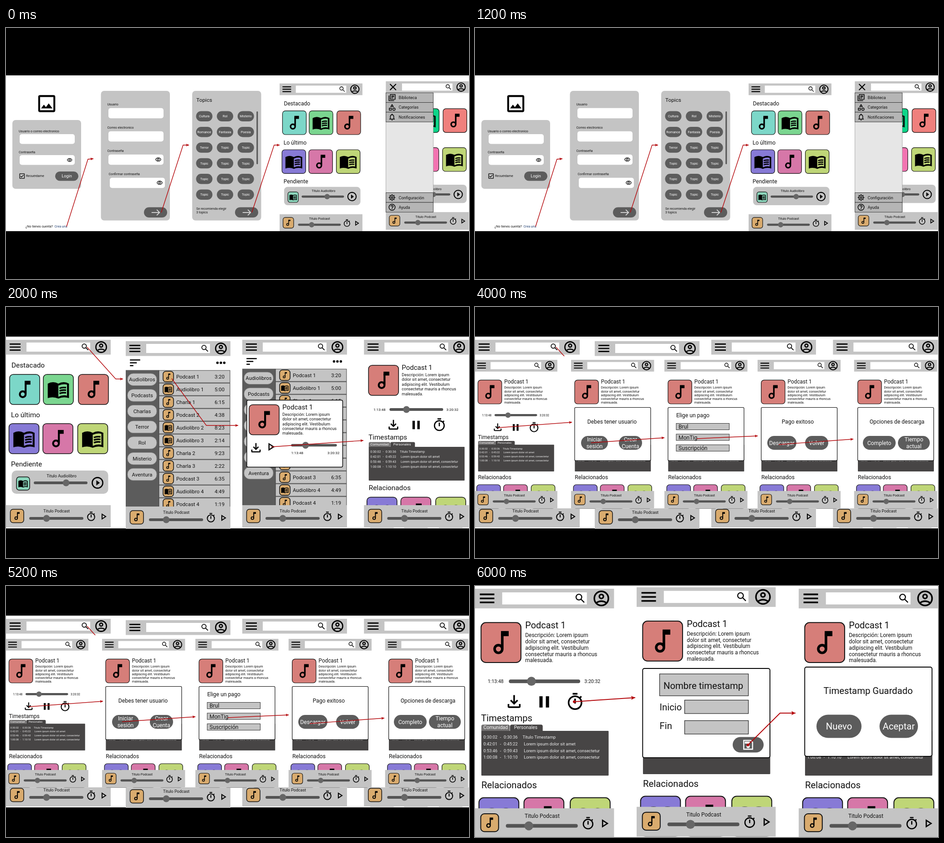
Write an HTML page that moves like this. It is 1017 px wide and 551 px high and loops after 8 s.

```html
<!DOCTYPE html>
<html lang="es">
<head>
<meta charset="utf-8">
<style>
html, body { margin: 0; width: 100%; height: 100%; overflow: hidden; background: #000; }
svg { display: block; font-family: Roboto, sans-serif; }
</style>
</head>
<body>
<svg id="stage" width="1017" height="551" viewBox="0 0 1017 551"></svg>
<script>
const GREY = '#c4c4c4', DARK = '#5c5c5c', RED = '#d67e79', TAN = '#d9ab6e', PURPLE = '#877ad6',
  PINK = '#d677a8', LIME = '#bfd677', TEAL = '#7cd7c8', GREEN = '#7bd690';

// Icons on a 24 unit grid: [stroked path, filled path, stroke width]
const ring = (x, y, r) => `M${x - r} ${y}a${r} ${r} 0 1 0 ${2 * r} 0 ${r} ${r} 0 1 0 ${-2 * r} 0`;
const teeth = [...Array(8).keys()].map(i => {
  const c = Math.cos(i * Math.PI / 4), s = Math.sin(i * Math.PI / 4);
  return `M${12 + 7 * c} ${12 + 7 * s}L${12 + 9.7 * c} ${12 + 9.7 * s}`;
}).join('');
const box = 'M5 4h14q1 0 1 1v14q0 1-1 1H5q-1 0-1-1V5q0-1 1-1z';
const ICONS = {
  menu: ['M3 7h18M3 12h18M3 17h18'],
  sort: ['M3 7h18M3 12h12M3 17h6'],
  close: ['M5.7 5.7 18.3 18.3M18.3 5.7 5.7 18.3'],
  search: [ring(9.5, 9.5, 5.5) + 'M13.5 13.5 19.8 19.8'],
  user: [ring(12, 12, 9) + ring(12, 9.5, 2.6) + 'M5.6 17.6Q12 13.4 18.4 17.6'],
  note: [ring(10, 17, 3) + 'M13 17V5', 'M12 3h6v4h-6z'],
  book: ['M13.2 10.8q3-1.3 6.8-.7m-6.8 3.4q3-1.3 6.8-.7m-6.8 3.4q3-1.3 6.8-.7',
    'M1 6q5.5-3 11 0 5.5-3 11 0v15q-5.5-2-11 .5-5.5-2.5-11-.5zM12 8v11.5q5-2.2 9-1V7q-4-1.2-9 1z', 1.6],
  play: ['M9 6.8v10.4L17.1 12z'],
  playRing: [ring(12, 12, 9), 'M10 16.5v-9l6 4.5z'],
  timer: [ring(12, 13, 8) + 'M12 8v6M9 2h6M18.2 6.8 19.8 5.2'],
  pause: ['', 'M6 5h4v14H6zM14 5h4v14h-4z'],
  download: ['M12 4v10M7.7 10.3l4.3 4.3 4.3-4.3M5 15v3q0 1 1 1h12q1 0 1-1v-3'],
  image: [box, 'M6 17l3-3.9 2.1 2.6 3-3.9L18 17z'],
  check: [box + 'M6.7 12.3l3.3 3.3 7.3-7.3'],
  eye: ['M2.1 11.5Q5 5 12 5t9.9 6.5Q19 18 12 18T2.1 11.5z' + ring(12, 11.5, 3.5)],
  books: ['M3 6v15h15M7 3h14v14H7zM10 7h8m-8 3h8m-8 3h4'],
  shapes: ['M12 4 8.3 10h7.4zM4 14.5h6v6H4z' + ring(17.5, 17.5, 3.5)],
  bell: ['M7 18v-7q0-5.5 5-5.5t5 5.5v7M4 18h16', ring(12, 4, 1.5) + 'M10 20h4q0 2-2 2t-2-2z'],
  gear: [ring(12, 12, 6.8) + ring(12, 12, 2.7) + teeth],
  help: [ring(12, 12, 9) + 'M9 10q0-3 3-3t3 3c0 2-3 2-3 5M12 16v2'],
  save: ['M4 4h12.6L20 7.4V20H4z', 'M6 6h9v4H6z' + ring(12, 15, 3)],
  next: ['M2 12h20M15 5l7 7-7 7']
};

const icon = (name, x, y, size, color = '#000') => {
  const [line, fill = '', w = 2] = ICONS[name];
  return `<g transform="translate(${x - size / 2} ${y - size / 2}) scale(${size / 24})">
    <path d="${fill}" fill="${color}" fill-rule="evenodd"/>
    <path d="${line}" fill="none" stroke="${color}" stroke-width="${w}"/></g>`;
};
const rect = (x, y, w, h, fill, r = 0, stroke = 'none', sw = 1) =>
  `<rect x="${x}" y="${y}" width="${w}" height="${h}" rx="${r}" fill="${fill}" stroke="${stroke}" stroke-width="${sw}"/>`;
const text = (x, y, size, str, fill = '#111', anchor = 'start') =>
  `<text x="${x}" y="${y}" font-size="${size}" fill="${fill}" text-anchor="${anchor}">${str}</text>`;
const mid = (x, y, size, str, fill) => text(x, y + size * .355, size, str, fill, 'middle');
const at = (x, y, scale, body) => `<g transform="translate(${x} ${y}) scale(${scale})">${body}</g>`;
const tile = (x, y, size, fill, name) =>
  rect(x, y, size, size, fill, size > 40 ? 8 : 6, '#111', 1.5) + icon(name, x + size / 2, y + size / 2, size * .77);
const slider = (x1, x2, y, knob, w = 6) =>
  `<path d="M${x1} ${y}H${x2}" stroke="#545454" stroke-width="${w}" stroke-linecap="round"/>
   <circle cx="${knob}" cy="${y}" r="7.4" fill="#666"/>`;
// Pill button with one or more lines of text
const pill = (x, y, w, h, size = 0, ...lines) => rect(x, y, w, h, DARK, h / 2) +
  lines.map((s, i) => mid(x + w / 2, y + h / 2 + (i - (lines.length - 1) / 2) * size * 1.18, size, s, '#fff')).join('');
const arrow = (points, w = 1.4) =>
  `<polyline points="${points}" fill="none" stroke="#b4080c" stroke-width="${w}" marker-end="url(#head)"/>`;

// Phone parts, drawn on a screen 230 wide and 411 high
const header = (left = 'menu') => rect(0, 0, 230, 32.5, GREY) + rect(45, 6, 140, 20, '#fff') +
  icon(left, 20, 16, 32) + icon('search', 174, 16, 20.5) + icon('user', 209, 16, 31);
const player = () => rect(0, 363, 230, 49, GREY) + tile(9.5, 372, 29.5, TAN, 'note') +
  mid(111, 375.5, 9, 'Titulo Podcast') + slider(54, 167, 392, 89) +
  icon('timer', 187, 388, 23.5) + icon('play', 214, 388, 24);

const home = (left, green = GREEN, red = RED, pink = PINK) => rect(0, 0, 230, 412, '#fff') +
  text(12, 61, 15.3, 'Destacado') + text(11, 169.5, 15.3, 'Lo último') + text(11, 277.5, 15.3, 'Pendiente') +
  tile(8, 76, 66, TEAL, 'note') + tile(82, 76, 66, green, 'book') + tile(159, 76, 66, red, 'note') +
  tile(6.5, 184, 66, PURPLE, 'book') + tile(81, 184, 66, pink, 'note') + tile(157.5, 184, 66, LIME, 'book') +
  rect(12.5, 287, 212, 51, GREY, 10) + tile(23, 301, 29, '#8cd6bc', 'book') +
  mid(122, 298.5, 9, 'Titulo Audiolibro') + slider(64, 176, 314, 132) + icon('playRing', 201, 314, 31) +
  header(left) + player();

const about = (x, y) => text(x, y, 15, 'Podcast 1') +
  ['Descripción: Lorem ipsum', 'dolor sit amet, consectetur', 'adipiscing elit. Vestibulum',
    'consectetur mauris a rhoncus', 'malesuada.'].map((s, i) => text(x, y + 14.2 + i * 10.4, 9, s)).join('');

const stamps = [['0:30:02', '0:30:36', 'Título Timestamp'], ['0:42:01', '0:45:22', 'Lorem ipsum dolor sit amet'],
  ['0:53:46', '0:59:43', 'Lorem ipsum dolor sit amet, consectetur'],
  ['1:00:08', '1:10:10', 'Lorem ipsum dolor sit amet, consectetur']];
const detail = (dialogY) => rect(0, 0, 230, 412, '#fff') +
  tile(10, 56, 66, RED, 'note') + about(83, 65.7) +
  text(21, 156, 8, '1:13:48') + text(181, 156, 8, '3:20:32') + slider(59, 171, 153, 93.3) +
  icon('download', 64.7, 186.5, 32) + icon('pause', 114.5, 187, 32) + icon('timer', 165.5, 187, 32) +
  text(10, 219, 15.2, 'Timestamps') +
  rect(10.5, 224.5, 47, 14, '#737171', 3) + rect(58, 224.5, 54, 14, '#474545', 3) +
  rect(10.5, 235, 210.5, 74, '#474545', 1) +
  text(14, 232.3, 7.9, 'Comunidad', '#fff') + text(64.5, 232.3, 7.8, 'Personales', '#fff') +
  stamps.map(([a, b, s], i) => {
    const y = 248 + i * 11;
    return text(14, y, 7, a, '#eee') + text(41.3, y, 7, '-', '#eee') + text(47.5, y, 7, b, '#eee') +
      text(i ? 80.7 : 78.7, y, 7, s, '#eee');
  }).join('') +
  text(10.5, 330, 15.3, 'Relacionados') + tile(6.5, 345.5, 66, PURPLE, 'book') +
  tile(81, 345.5, 66, PINK, 'note') + tile(157.5, 345.5, 66, LIME, 'book') + header() + player() +
  (dialogY ? rect(10, dialogY, 210.5, 147.5, '#fff', 3, '#000', 1.4) : '');

const topics = ['Audiolibros', 'Podcasts', 'Charlas', 'Terror', 'Rol', 'Misterio', 'Aventura'];
const items = ['Podcast 1 3:20', 'Audiolibro 1 5:00', 'Charla 1 6:15', 'Podcast 2 4:38', 'Audiolibro 2 8:23',
  'Audiolibro 3 2:14', 'Charla 2 9:23', 'Charla 3 2:22', 'Podcast 3 6:35', 'Audiolibro 4 4:49', 'Podcast 4 1:19'];
const results = () => rect(0, 0, 230, 411, '#fff') + header() + icon('sort', 20.5, 47.5, 30) +
  [201.5, 209, 216.5].map(x => `<circle cx="${x}" cy="47.5" r="2.7"/>`).join('') +
  rect(0, 63.5, 73, 300, DARK) +
  topics.map((s, i) => rect(4, 71 + i * 34.7, 64, 26.5, GREY, 12.5, '#888', .8) +
    mid(36, 84.3 + i * 34.7, 11.4, s)).join('') +
  items.map((s, i) => {
    const y = 77.7 + i * 28, cut = s.lastIndexOf(' ');
    return rect(73, y - 13.5, 156, 27, GREY, 0, '#333', .9) +
      tile(82, y - 11.5, 23, TAN, s[0] == 'A' ? 'book' : 'note') +
      text(111, y + 4, 11.3, s.slice(0, cut)) + text(217, y + 4, 11.3, s.slice(cut + 1), '#111', 'end');
  }).join('') + player();

const field = (x, y, h = 21.5) => rect(x, y, 121, h, '#fff', 5);
const label = (x, y, s, fill) => text(x, y, 7.1, s, fill);
const nextButton = x => pill(x, 393.5, 51, 22.5) + icon('next', x + 25.5, 405, 21, '#ddd');
const chips = ['Cultura', 'Rol', 'Misterio', 'Romance', 'Fantasía', 'Poesía', 'Terror'];
const menuRow = (y, name, s) => rect(834.5, y, 104, 21.3, '#b5b5b5', 0, '#222', .8) +
  icon(name, 848, y + 10.6, 18) + text(862.5, y + 13.9, 9.05, s);

const signUp = rect(0, 104, 1017, 342, '#fff') + icon('image', 89.5, 166, 50) +
  rect(14, 202, 151, 151, GREY, 7) + label(28, 228.5, 'Usuario o correo electronico') + field(30, 233) +
  label(28, 275, 'Contraseña') + field(30, 279) + icon('eye', 139.7, 290, 12.5) +
  icon('check', 35.3, 325, 15.5) + label(44, 327.3, 'Recuérdame') + pill(108, 315, 51, 20.5, 9.1, 'Login') +
  label(43, 438.3, '¿No tienes cuenta?') + label(106.5, 438.3, 'Crea una', '#1d3d70') +
  rect(208.5, 138, 151.5, 284.5, GREY, 7) +
  ['Usuario', 'Correo electronico', 'Contraseña', 'Confirmar contraseña'].map((s, i) => {
    const x = i == 3 ? 3 : 0, y = 170 + i * 51;
    return label(222.5 + x, y, s) + field(225 + x, y + 5.7, 22.5) +
      (i > 1 ? icon('eye', 334.5 + x, y + 17, 14) : '');
  }).join('') + nextButton(303) +
  rect(409, 138, 151.5, 284.5, GREY, 7) + text(418, 162, 11.8, 'Topics') +
  [...Array(18).keys()].map(i =>
    pill(417.5 + i % 3 * 45.6, 182.5 + (i / 3 | 0) * 34.4, 36, 22.5, 7.2, chips[i] || 'Topic')).join('') +
  rect(550.3, 183, 3, 116, '#555', 1.5) +
  label(418, 399, 'Se recomienda elegir') + label(418, 407.3, '3 topics') + nextButton(503) +
  at(601, 121.7, .791, home()) + at(834.3, 117, .791, home('close', '#0cd488', '#ef807d', '#f274b1')) +
  rect(834.5, 206, 104, 156, '#e6e6e6', 0, '#999', .8) +
  menuRow(142.2, 'books', 'Biblioteca') + menuRow(163.5, 'shapes', 'Categorías') +
  menuRow(184.8, 'bell', 'Notificaciones') + menuRow(361.6, 'gear', 'Configuración') + menuRow(382.9, 'help', 'Ayuda') +
  rect(0, 446, 1017, 105, '#000') +
  arrow('133,436 180,288 192,287') + arrow('341,405 389,257 402,257') + arrow('540,405 589,257 601,257');

const search = rect(0, 65, 1017, 421, '#fff') + at(0, 72, 1, home()) + at(263, 75, 1, results()) +
  at(519, 72, 1, results()) + at(786.3, 72, 1, detail()) +
  rect(529, 204.5, 210.5, 147, '#fff', 3, '#000', 1.4) + tile(534, 214.5, 66, RED, 'note') + about(607, 224.5) +
  icon('download', 549, 309, 31) + icon('play', 581.5, 307, 30) + slider(629, 724, 303.5, 658, 5.5) +
  text(626.5, 323, 8.1, '1:13:48') + text(706, 323, 8.1, '3:20:32') +
  arrow('178,88 241,158 257,158') + arrow('364,157 440,260 510,260') + arrow('583,307 785,293');

const option = (y, s) => rect(442, y, 116.5, 14, GREY, 0, '#222', .9) + text(447, y + 11.5, 12.2, s);
const payment = rect(0, 108, 1017, 334, '#fff') + at(-1.5, 116, .793, detail()) +
  [211, 416, 620.7, 832.7].map(x => at(x, 116, .793, detail(131.7))).join('') +
  mid(301, 252, 12.2, 'Debes tener usuario') +
  pill(233, 283, 59, 30.5, 12.2, 'Iniciar', 'sesión') + pill(316, 283, 51, 30.5, 12.2, 'Crear', 'Cuenta') +
  text(442, 242.4, 12.2, 'Elige un pago') + option(255.5, 'Brul') + option(279, 'MonTig') + option(302.5, 'Suscripción') +
  mid(709, 252, 12.2, 'Pago exitoso') +
  pill(642, 283, 64, 30.5, 12.2, 'Descargar') + pill(725, 283, 51, 30.5, 12.2, 'Volver') +
  mid(927, 252, 12.2, 'Opciones de descarga') +
  pill(852, 283, 72, 30.5, 12.2, 'Completo') + pill(929, 283, 70, 30.5, 12.2, 'Tiempo', 'actual') +
  arrow('50,265 213,253') + arrow('255,298 416,287') + arrow('487,289 621,283') + arrow('667,302 831,290');

const slot = (x, y, w, h) => rect(x, y, w, h, GREY, 0, '#222', 1.2);
const dot = (x, y) => `<circle cx="${x}" cy="${y}" r="3" fill="#b4080c"/>`;
const saving = rect(0, 0, 1017, 551, '#fff') + at(0, 6, 1.328, detail()) +
  at(355, 2.7, 1.328, detail(134.3)) + at(711, 6, 1.328, detail(129.5)) +
  slot(405.5, 193, 195, 48) + text(414, 226, 20.3, 'Nombre timestamp') +
  text(405.5, 272.5, 20.3, 'Inicio') + slot(460.5, 250.5, 140, 29.5) +
  text(405.5, 314, 20.3, 'Fin') + slot(460.5, 295.5, 140, 29.5) +
  pill(566, 331.5, 68, 34) + icon('save', 600, 348.5, 29, '#fff') +
  mid(863.5, 230, 20.3, 'Timestamp Guardado') +
  pill(750, 282.5, 99, 51, 20.3, 'Nuevo') + pill(888.5, 282.5, 84.5, 51, 20.3, 'Aceptar') +
  dot(218, 254) + arrow('218,254 352,245', 2) + dot(599.5, 349) + arrow('599.5,349 670,279 704,279', 2);

const stage = document.getElementById('stage');
stage.innerHTML = `<defs><marker id="head" orient="auto" overflow="visible">
  <path d="M0 0L-4.6-2.2-3.6 0-4.6 2.2z" fill="#b4080c"/></marker></defs>` +
  [signUp, search, payment, saving].map(s => `<g class="scene">${s}</g>`).join('');
const scenes = stage.querySelectorAll('.scene');

function draw() {
  const now = Math.floor(performance.now() % 8000 / 2000);
  // The payment screens lie over the search screens, whose edges stay visible
  scenes.forEach((g, i) => g.style.display = i == now || (i == 1 && now == 2) ? '' : 'none');
  requestAnimationFrame(draw);
}
draw();
</script>
</body>
</html>
```
